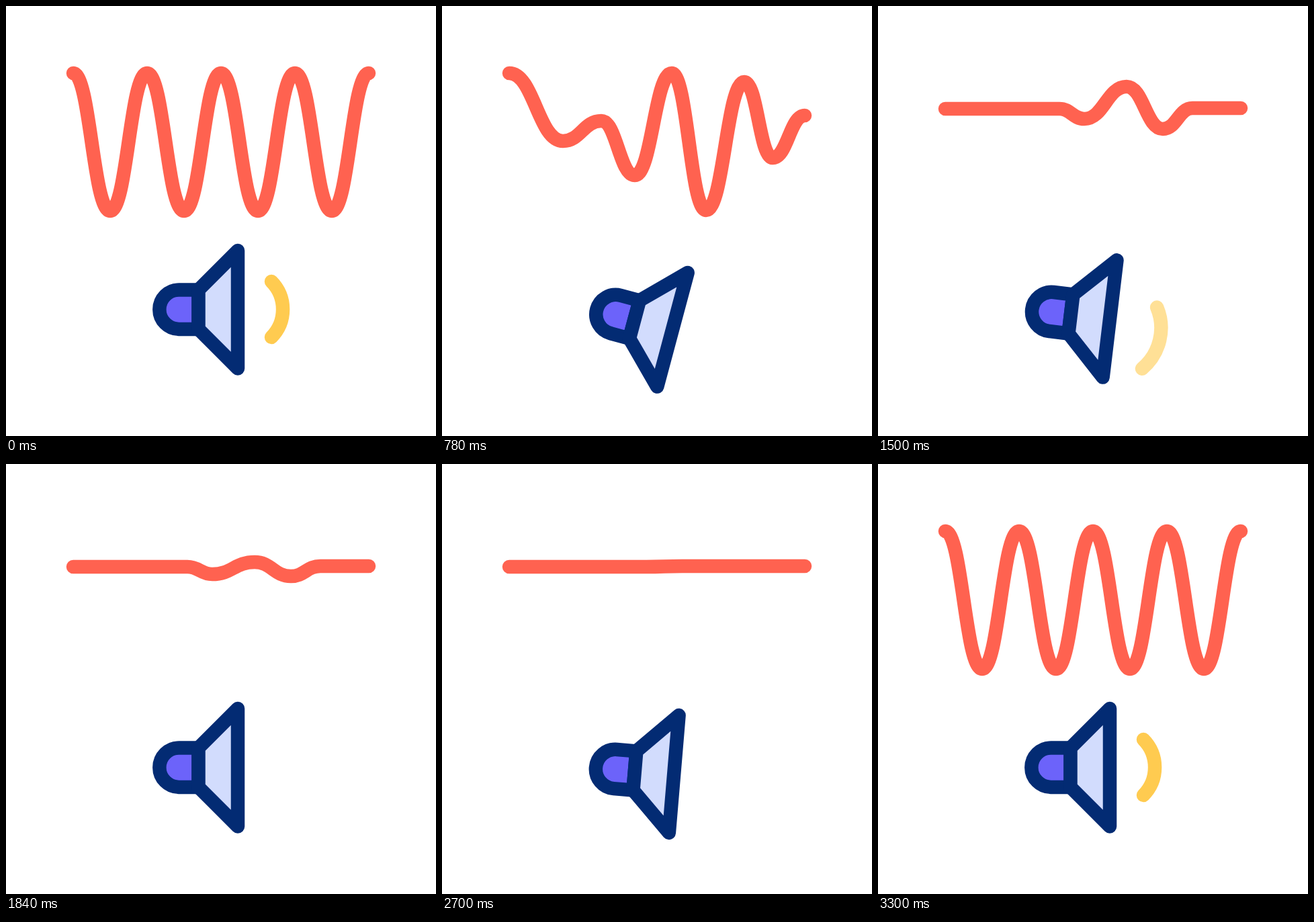
Write an HTML page that moves like this. It is 640x640 px and loops after 3600 ms.

```html
<!DOCTYPE html>
<html lang="en">
<head>
<meta charset="utf-8">
<title>Sound wave</title>
<style>
  html, body { margin: 0; width: 100%; height: 100%; overflow: hidden; background: #fff; }
  svg { display: block; width: 100vw; height: 100vh; }
  path { stroke-width: 20.5; stroke-linecap: round; stroke-linejoin: round; fill: none; }
  #wave { stroke: #ff6250; }
  #speaker path { stroke: #032b73; }
  #arc path { stroke: #ffcb50; }
</style>
</head>
<body>
<svg viewBox="0 0 640 640">
  <path id="wave"/>
  <g id="speaker">
    <path fill="#6c63fa" style="fill:#6c63fa" d="M286.5 422.5H257.5a29.2 29.2 0 0 0 0 58.4H286.5Z"/>
    <path style="fill:#d2dcfd" d="M286.5 422.5L345 364V539.5L286.5 480.9Z"/>
  </g>
  <g id="arc">
    <path id="near" d="M395 410A59 59 0 0 1 395 493"/>
    <path id="far" opacity=".6" d="M407.4 405A79 79 0 0 1 407.4 499"/>
  </g>
</svg>
<script>
const LOOP = 3600, START = 440, ARC_STEP = 300, HANDLE = 0.46;
const PIVOT = '230 459';
const $ = id => document.getElementById(id);

// A pose lists the x and y of the crests and troughs from left to right.
const fullX = Array.from({ length: 9 }, (_, i) => 100 + 55 * i);
const driftX = [100, 196, 270, 307, 370, 424, 468, 505, 540];
const flatX = [100, 152, 197, 242, 304, 357, 402, 442, 540];
const pose = (xs, ys) => [...xs, ...ys];
const bump = (a, b, c) => pose(driftX, [153, 153, 153, a, b, c, 152, 152, 152]);

const full = pose(fullX, fullX.map((_, i) => i % 2 ? 305 : 100));
const uneven = pose([100, 180, 237, 287, 342, 393, 450, 492, 540],
                    [100, 201, 171, 252, 100, 304, 113, 226, 163]);
const flat = pose(flatX, flatX.map((_, i) => i < 5 ? 153 : 152));

const waveKeys = [
  [START, full], [780, uneven], [1180, bump(168, 120, 183)],
  [1500, bump(168, 120, 183)], [1580, bump(168, 109, 183)],
  [1840, bump(164, 146, 167)], [2040, bump(160, 140, 162)],
  [2300, bump(153, 153, 152)], [2720, flat], [3190, full]
];

const turnKeys = [
  [START, [0]], [590, [-12]], [780, [15]], [1120, [-15]], [1400, [7.8]],
  [1840, [0]], [2335, [-19]], [2580, [14]], [2925, [-19.5]], [3300, [0]]
];

// Sine easing between neighbouring keys, held outside them.
function sample(keys, t) {
  const next = keys.findIndex(k => k[0] > t);
  if (next === 0) return keys[0][1];
  if (next < 0) return keys[keys.length - 1][1];
  const [t0, a] = keys[next - 1], [t1, b] = keys[next];
  const u = (1 - Math.cos(Math.PI * (t - t0) / (t1 - t0))) / 2;
  return a.map((v, i) => v + (b[i] - v) * u);
}

function wavePath(p) {
  let d = `M${p[0]} ${p[9]}`;
  for (let i = 1; i < 9; i++) {
    const h = (p[i] - p[i - 1]) * HANDLE;
    d += `C${p[i - 1] + h} ${p[i + 8]} ${p[i] - h} ${p[i + 9]} ${p[i]} ${p[i + 9]}`;
  }
  return d;
}

// The sound arc steps through near, far and hidden, ending on near.
function arcState(t) {
  if (t <= START) return 0;
  return Math.min(9, Math.floor((t - START) / ARC_STEP) + 1) % 3;
}

function draw(t) {
  const [turn] = sample(turnKeys, t), state = arcState(t);
  $('wave').setAttribute('d', wavePath(sample(waveKeys, t)));
  $('speaker').setAttribute('transform', `rotate(${turn} ${PIVOT})`);
  $('arc').setAttribute('transform', `rotate(${2 * turn} ${PIVOT})`);
  $('near').style.display = state === 0 ? '' : 'none';
  $('far').style.display = state === 1 ? '' : 'none';
}

const begin = performance.now();
function tick() {
  draw((performance.now() - begin) % LOOP);
  requestAnimationFrame(tick);
}
tick();
</script>
</body>
</html>
```
